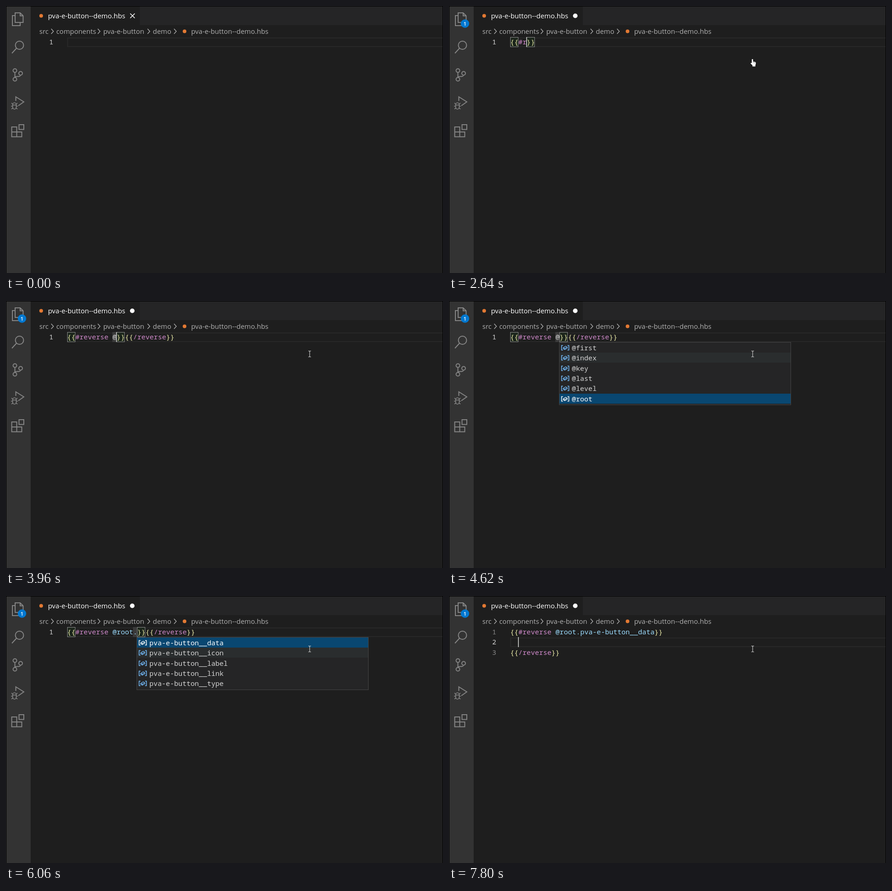
Animation of 957 by 585 pixels, one loop 8 s. Source, as an HTML page with a canvas:

```html
<!DOCTYPE html>
<html lang="en">
<head>
<meta charset="utf-8">
<title>Template helper completion</title>
<style>
  html, body { margin: 0; width: 100%; height: 100%; overflow: hidden; background: #1e1e1e; }
  canvas { display: block; }
</style>
</head>
<body>
<canvas id="stage" width="957" height="585"></canvas>
<script>
const ctx = document.getElementById("stage").getContext("2d");
const LOOP = 8000, TICK = 60;
const CODE_X = 133.5, CHAR = 9.03, ROW = 22.33, ROW_TOP = 68;
const CODE_FONT = '500 15.05px "Noto Sans Mono", monospace';
const BOLD_FONT = CODE_FONT.replace("500", "bold");
const UI_FONT = '14.95px "Open Sans", "Noto Sans", sans-serif';
const GREY = "#858585", TEXT = "#d4d4d4", CRUMB = "#b0b0b0";

const colX = col => CODE_X + col * CHAR;
const rowY = row => Math.round(ROW_TOP + row * ROW);

// Completion menus; *stars* mark the matched letters.
const menus = {
  helpers: {
    col: 5, icon: "cube", selected: 0, scrollbar: true,
    items: ["*re*verse", "*re*verse", "*e*rror", "to*Re*gex", "url*Re*solve", "for*E*ach",
      "prepend", "*e*ncodeURI", "url_*e*ncode", "toPrecision", "merge", "before"]
  },
  globals: {
    col: 12, icon: "variable", selected: 5,
    items: ["@first", "@index", "@key", "@last", "@level", "@root"]
  },
  data: {
    col: 17, icon: "variable", selected: 0,
    items: ["pva-e-button__data", "pva-e-button__icon", "pva-e-button__label",
      "pva-e-button__link", "pva-e-button__type"]
  }
};

// One line of code with the caret in front of the closing braces.
const typed = (text, col) =>
  ({ lines: [text], caret: [0, col], boxes: [[0, 0], [0, col]] });
const block = arg => typed(`{{#reverse ${arg}}}{{/reverse}}`, 11 + arg.length);
const off = { caret: null };
const OPEN = "{{#reverse @root.pva-e-button__data}}", CLOSE = "{{/reverse}}";

const steps = [
  [0, { lines: [""], caret: null, boxes: [], highlight: 0, active: 0 }],
  [600, { caret: [0, 0] }],
  [1080, off],
  [1500, { lines: ["{}"], caret: [0, 1] }],
  [1560, { dirty: true }],
  [1680, { badge: true }],
  [1740, { lines: ["{{}}"], caret: [0, 2] }],
  [1800, { boxes: [[0, 0], [0, 2]] }],
  [2220, off],
  [2280, typed("{{#}}", 3)],
  [2580, typed("{{#r}}", 4)],
  [2640, { hand: true }],
  [2700, typed("{{#re}}", 5)],
  [2760, { menu: "helpers" }],
  [3240, off],
  [3300, { ...block(""), menu: null, hand: false }],
  [3780, off],
  [3960, { ...block("@"), placeholder: 11 }],
  [4020, { menu: "globals", hand: true }],
  [4440, off],
  [4620, { hand: false }],
  [4680, { ...block("@root"), menu: null, placeholder: null }],
  [5160, off],
  [5280, { ...block("@root."), placeholder: 16 }],
  [5340, { hand: true }],
  [5400, { menu: "data" }],
  [5760, off],
  [6060, { hand: false }],
  [6120, { ...block("@root.pva-e-button__data"), menu: null, placeholder: null }],
  [6540, { caret: [0, 36], boxes: [] }],
  [6600, { caret: [0, 37], boxes: [[0, 37], [0, 47]] }],
  [7020, { lines: [OPEN, CLOSE], caret: [1, 0], boxes: [[1, 0], [1, 10]], highlight: 1, active: 1 }],
  [7320, { lines: [OPEN, "", CLOSE], caret: [2, 0], boxes: [[2, 0], [2, 10]], active: 2 }],
  [7560, { caret: [1, 0], active: 1 }],
  [7620, { boxes: [] }],
  [7800, { caret: [1, 2] }]
];

function rect(x, y, w, h, color) {
  ctx.fillStyle = color;
  ctx.fillRect(x, y, w, h);
}

function frame(x, y, w, h, color, width = 1) {
  ctx.strokeStyle = color;
  ctx.lineWidth = width;
  ctx.strokeRect(x, y, w, h);
}

function stroke(path, color, width = 2) {
  ctx.strokeStyle = color;
  ctx.lineWidth = width;
  ctx.stroke(new Path2D(path));
}

function disc(x, y, r, color) {
  ctx.fillStyle = color;
  ctx.beginPath();
  ctx.arc(x, y, r, 0, 7);
  ctx.fill();
}

function text(str, x, y, color, font = CODE_FONT) {
  ctx.font = font;
  ctx.fillStyle = color;
  ctx.fillText(str, x, y);
}

function at(x, y, draw) {
  ctx.save();
  ctx.translate(x, y);
  draw();
  ctx.restore();
}

function drawActivityBar(badge) {
  rect(0, 0, 54, 585, "#333333");
  stroke("M20 15H31L37.5 21.5V36H20ZM31 15V21.5H37.5M20 21H14V43H31V36", GREY);
  stroke("M38.5 86a9 9 0 1 0-18 0a9 9 0 1 0 18 0M23 92.5L13 103.5", GREY);
  stroke("M23.5 141.5a4 4 0 1 0-8 0a4 4 0 1 0 8 0M36 147.5a4 4 0 1 0-8 0a4 4 0 1 0 8 0" +
    "M23.5 160.5a4 4 0 1 0-8 0a4 4 0 1 0 8 0M19.5 145.5V156.5M32 151.5Q31 154.5 27 154.5H24Q20 154.5 19.5 156.5", GREY);
  stroke("M21.5 208V199L39 210L27 218.5", GREY);
  stroke("M14.5 217a4 5 0 0 1 8 0v4a4 5 0 0 1-8 0ZM14.5 217H22.5M11 219.5H14M23 219.5H26" +
    "M12 212.5L15 215.5M25 212.5L22 215.5M12 226L15 223M25 226L22 223", GREY, 1.7);
  stroke("M12.5 265H23.5V286.5H12.5ZM12.5 276H34.5V286.5H23.5M28.5 260H39V270.5H28.5Z", GREY);
  if (badge) {
    disc(35, 38.5, 9.3, "#0078d0");
    ctx.textAlign = "center";
    text("1", 35, 42.5, "#fff", '600 11px "Open Sans", sans-serif');
    ctx.textAlign = "left";
  }
}

function drawHeader(dirty) {
  rect(54, 0, 903, 42, "#252526");
  rect(54, 0, 239, 42, "#1e1e1e");
  disc(77, 21.5, 4, "#e37933");
  text("pva-e-button--demo.hbs", 92, 27, "#fff", UI_FONT);
  if (dirty) disc(276.5, 21.5, 5, "#fff");
  else stroke("M272 16.5L282 26.5M282 16.5L272 26.5", "#fff", 1.6);

  const crumbs = [["src", 73], ["components", 110], ["pva-e-button", 213], ["demo", 321.5],
    ["pva-e-button--demo.hbs", 405.5]];
  for (const [label, x] of crumbs) text(label, x, 61, CRUMB, UI_FONT);
  for (const x of [99, 201, 310, 368]) stroke(`M${x} 50l5 5.5l-5 5.5`, CRUMB, 1.4);
  disc(391, 55.5, 4, "#e37933");
}

function tokenColor(token) {
  if (/^(\{\{|\}\})/.test(token)) return "#eaeaa8";
  if (/^[#\/]\w/.test(token)) return "#d08acb";
  if (/^@\w/.test(token)) return "#9cdcfe";
  return TEXT;
}

function drawCode({ lines, caret, boxes, highlight, active, placeholder }) {
  frame(135, rowY(highlight) + 2, 830, 19, "#282828", 2);
  if (placeholder) rect(colX(placeholder), ROW_TOP, CHAR, 22, "#3a3a3a");
  for (const [row, col] of boxes) {
    const x = Math.round(colX(col)) + .5, y = rowY(row) + .5;
    rect(x, y, 17, 21, "rgba(0,100,0,.1)");
    frame(x, y, 17, 21, "#888");
  }
  lines.forEach((line, row) => {
    const y = rowY(row) + 16;
    text(String(row + 1), 94.5, y, row === active ? TEXT : GREY);
    for (const m of line.matchAll(/\{\{|\}\}|[#\/]\w+|@[\w.-]+|\S/g))
      text(m[0], colX(m.index) + .5, y, tokenColor(m[0]));
  });
  if (caret) rect(Math.floor(colX(caret[1])), rowY(caret[0]), 2, 22, "#aeafad");
}

const icons = {
  cube: {
    color: "#b180d7",
    draw: color => stroke("M0-7.5L6.5-4.5V3.5L0 7.5L-6.5 3.5V-4.5ZM-6.5-4.5L0-1L6.5-4.5M0-1V7.5", color, 1.4)
  },
  variable: {
    color: "#75beff",
    draw: color => {
      stroke("M-5-5H-8V5H-5M5-5H8V5H5", color, 1.5);
      stroke("M-4.5 0L1-3.5L4.5-1.5V1L-1 4L-4.5 2ZM-4.5 0L-1 1.5L4.5-1.5M-1 1.5V4", color, 1.2);
    }
  }
};

function drawMenu({ col, icon, selected, scrollbar, items }) {
  const left = Math.round(colX(col)), top = 91, width = 506;
  const { color, draw } = icons[icon];
  const height = Math.round(items.length * ROW) + 2;
  rect(left, top, width, height, "#252526");
  items.forEach((item, i) => {
    const y = Math.round(top + i * ROW), chosen = i === selected;
    if (chosen) rect(left, y, width, 22, "#094771");
    else if (i === 1) rect(left, y, width, 22, "#2a2d2e");
    at(left + 12.5, y + 11.5, () => draw(chosen ? "#fff" : color));
    let x = left + 27;
    item.split("*").forEach((part, k) => {
      const matched = k % 2;
      text(part, x, y + 17, matched ? "#18a3ff" : chosen ? "#fff" : TEXT,
        matched ? BOLD_FONT : CODE_FONT);
      x += part.length * CHAR;
    });
  });
  if (scrollbar) rect(left + width - 12, 142, 12, 68, "#4a4a4b");
  frame(left - .5, top - .5, width + 1, height + 1, "#454545");
}

function drawPointer(t, hand) {
  if (t < 180) return;
  const tick = Math.floor(t / TICK) * TICK;
  const away = (1 - Math.min(1, (tick - 180) / 420)) ** 2;
  at(665 + 174 * away, 116 + 14 * away, () => {
    if (!hand) {
      stroke("M-3-6.5H-1L0-5.5L1-6.5H3M0-5.5V5.5M-3 6.5H-1L0 5.5L1 6.5H3", "#c8c8c8", 1.2);
      return;
    }
    const shape = "M-2 1Q-.5-.5 1 1V5.5L5.5 6.5Q7.5 7 7 10L6 14V16.5H-.5V14L-4.5 10Q-5 8 -3 8.5L-2 9.5Z";
    stroke(shape, "#111", 1.6);
    ctx.fillStyle = "#fff";
    ctx.fill(new Path2D(shape));
    stroke("M1 5V9M3.3 6.5V9.5M5.3 7V9.5", "#555", .6);
  });
}

function render(now) {
  const t = now % LOOP;
  const state = Object.assign({}, ...steps.filter(([time]) => time <= t).map(([, change]) => change));
  rect(0, 0, 957, 585, "#1e1e1e");
  drawHeader(state.dirty);
  drawActivityBar(state.badge);
  drawCode(state);
  if (state.menu) drawMenu(menus[state.menu]);
  drawPointer(t, state.hand);
  frame(.5, .5, 956, 600, "#000");
}

const start = performance.now();
function loop() {
  render(performance.now() - start);
  requestAnimationFrame(loop);
}
loop();
</script>
</body>
</html>
```
